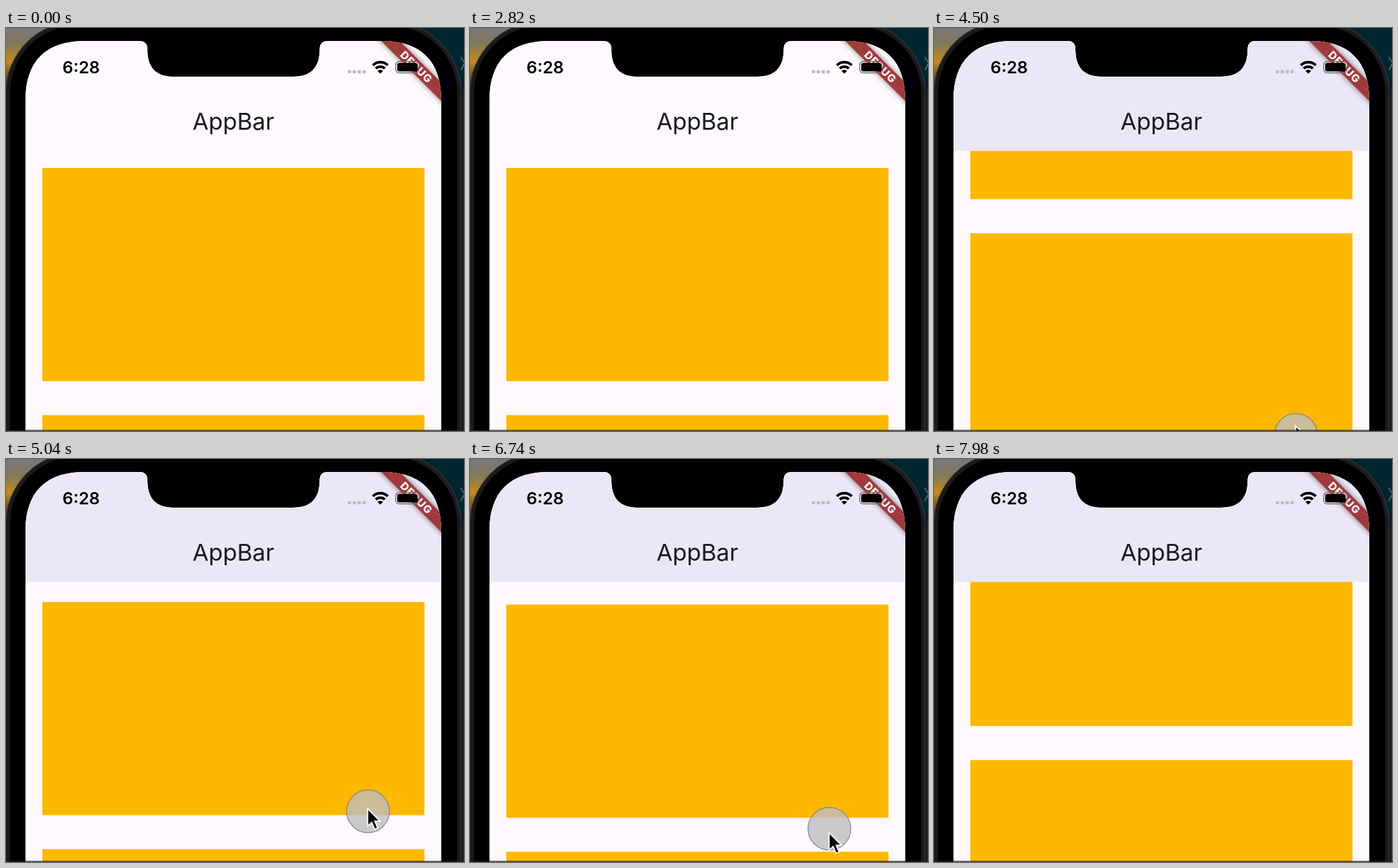
Write an HTML page that moves like this. It is 706x622 px and loops after 8 s.

```html
<!DOCTYPE html>
<html lang="en">
<head>
<meta charset="utf-8">
<title>Scrolling app bar</title>
<style>
  html, body { margin: 0; width: 100%; height: 100%; overflow: hidden; background: #0d0e10; }
  svg { display: block; width: 706px; height: 622px; }
  text { font-family: Inter, Roboto, sans-serif; }
</style>
</head>
<body>
<svg viewBox="0 0 706 622">
  <defs>
    <linearGradient id="leftGlow" x1="0" y1="0" x2="0" y2="1">
      <stop offset="0" stop-color="#77777c"/>
      <stop offset=".2" stop-color="#85785a"/>
      <stop offset=".4" stop-color="#c08c1c"/>
      <stop offset=".7" stop-color="#2e2718"/>
      <stop offset="1" stop-color="#0d0e10"/>
    </linearGradient>
    <clipPath id="screen">
      <path d="M30 622V112C30 51 61 20 122 20H205Q218 20 218 33C218 61 231 75 258 75H443C470 75 483.500 61 483.500 33Q483.500 20 496.500 20H579C640 20 671 51 671 112V622Z"/>
    </clipPath>
    <filter id="soft" x="-20%" y="-100%" width="140%" height="300%">
      <feGaussianBlur stdDeviation="5"/>
    </filter>
  </defs>

  <!-- desktop and phone body -->
  <rect width="100" height="130" fill="url(#leftGlow)"/>
  <rect x="600" width="106" height="92" fill="#00252e"/>
  <path d="M701 45l6 9-6 11" fill="none" stroke="#66777c" stroke-width="1.500"/>
  <rect x="704" y="92" width="1" height="530" fill="#3c3d40"/>
  <rect x="-.5" y="-10.500" width="702" height="800" rx="111" fill="#1b1b1d" stroke="#444446"/>
  <rect x="6" y="-4" width="689.500" height="800" rx="104"/>

  <g clip-path="url(#screen)">
    <rect width="706" height="622" fill="#fdf9fe"/>
    <g id="cards" fill="#ffb800"></g>
    <rect width="706" height="189.500" fill="#fdf9fe"/>
    <rect id="tint" width="706" height="189.500" fill="#ece7f6"/>
    <text x="350.500" y="156.500" font-size="36" text-anchor="middle" fill="#1c1b1f">AppBar</text>
    <g transform="translate(632 59.500) rotate(45)">
      <rect x="-100" y="-10" width="200" height="20" opacity=".5" filter="url(#soft)"/>
      <rect x="-100" y="-10" width="200" height="20" fill="#a23a3c"/>
      <text x="1" y="6" font-size="16.500" font-weight="800" letter-spacing="1" text-anchor="middle" fill="#fff">DEBUG</text>
    </g>

    <!-- status bar -->
    <text x="87" y="70" font-size="26" font-weight="600">6:28</text>
    <g fill="#bdbac3">
      <circle cx="529.500" cy="67.500" r="2.700"/>
      <circle cx="537" cy="67.500" r="2.700"/>
      <circle cx="544.500" cy="67.500" r="2.700"/>
      <circle cx="552" cy="67.500" r="2.700"/>
    </g>
    <g fill="none" stroke="#000" stroke-width="4">
      <path d="M565.500 57.500A16.500 16.500 0 0 1 588.500 57.500"/>
      <path d="M570 62.500A10 10 0 0 1 584 62.500"/>
    </g>
    <path d="M577 70.500l-4.300-4.300a6 6 0 0 1 8.600 0z"/>
    <rect x="600.700" y="51.700" width="36" height="17.500" rx="5" fill="none" stroke="#77696f" stroke-width="1.400"/>
    <rect x="603" y="54" width="31.500" height="13" rx="3"/>

    <circle id="touch" r="33" fill="#bfbfc1" fill-opacity=".8" stroke="#7d7d80" stroke-opacity=".8" stroke-width="1.500"/>
  </g>
  <path id="cursor" d="M0 0V27L6.300 21.300L10.700 32L15.500 30L11 19.500H19Z" stroke="#fff" stroke-width="1.800"/>
  <rect y="620.300" width="706" height="1.700" fill="#242426" opacity=".8"/>
</svg>

<script>
const LOOP = 8000, SCROLL_START = 3180, CARD_STEP = 381.5;
// [time in ms, scroll offset in px]
const keys = [[0, 0], [SCROLL_START, 0], [3760, 115], [4500, 280.5], [5150, 381.5],
              [6620, 381.5], [6740, 373], [6815, 356], [7980, 133], [8120, 106]];
const $ = id => document.getElementById(id);
const clamp = (v, lo, hi) => Math.min(hi, Math.max(lo, v));

const slope = i => (keys[i + 1][1] - keys[i][1]) / (keys[i + 1][0] - keys[i][0]);
const tangents = keys.map((_, i) => {
  if (i === 0) return 0;
  if (i === keys.length - 1) return slope(i - 1);
  const a = slope(i - 1), b = slope(i);
  return a * b <= 0 ? 0 : (a + b) / 2;
});

// Smooth Hermite curve through the keys.
function scrollAt(t) {
  t = clamp(t, 0, keys.at(-1)[0]);
  const i = Math.max(0, keys.findIndex(k => k[0] >= t) - 1);
  const [t0, a] = keys[i], [t1, b] = keys[i + 1];
  const d = t1 - t0, u = (t - t0) / d, v = 1 - u;
  return a * v * v * (1 + 2 * u) + b * u * u * (3 - 2 * u)
    + d * (tangents[i] * u * v * v - tangents[i + 1] * u * u * v);
}

for (let i = 0; i < 4; i++) {
  const card = document.createElementNS('http://www.w3.org/2000/svg', 'rect');
  const box = { x: 56, y: 216 + i * CARD_STEP, width: 589, height: 329 };
  for (const name in box) card.setAttribute(name, box[name]);
  $('cards').append(card);
}

const place = (id, x, y) => $(id).setAttribute('transform', `translate(${x} ${y})`);

function draw(now) {
  const t = now % LOOP;
  place('cards', 0, -scrollAt(t));
  $('tint').setAttribute('opacity', clamp((t - SCROLL_START) / 200, 0, 1));
  // The content trails the touch mark, which trails the pointer.
  const x = 558 - 4 * clamp((t - 6600) / 140, 0, 1);
  place('touch', x, 925 - scrollAt(t + 82));
  place('cursor', x - 0.5, 921 - scrollAt(t + 130));
  requestAnimationFrame(draw);
}
requestAnimationFrame(draw);
</script>
</body>
</html>
```
